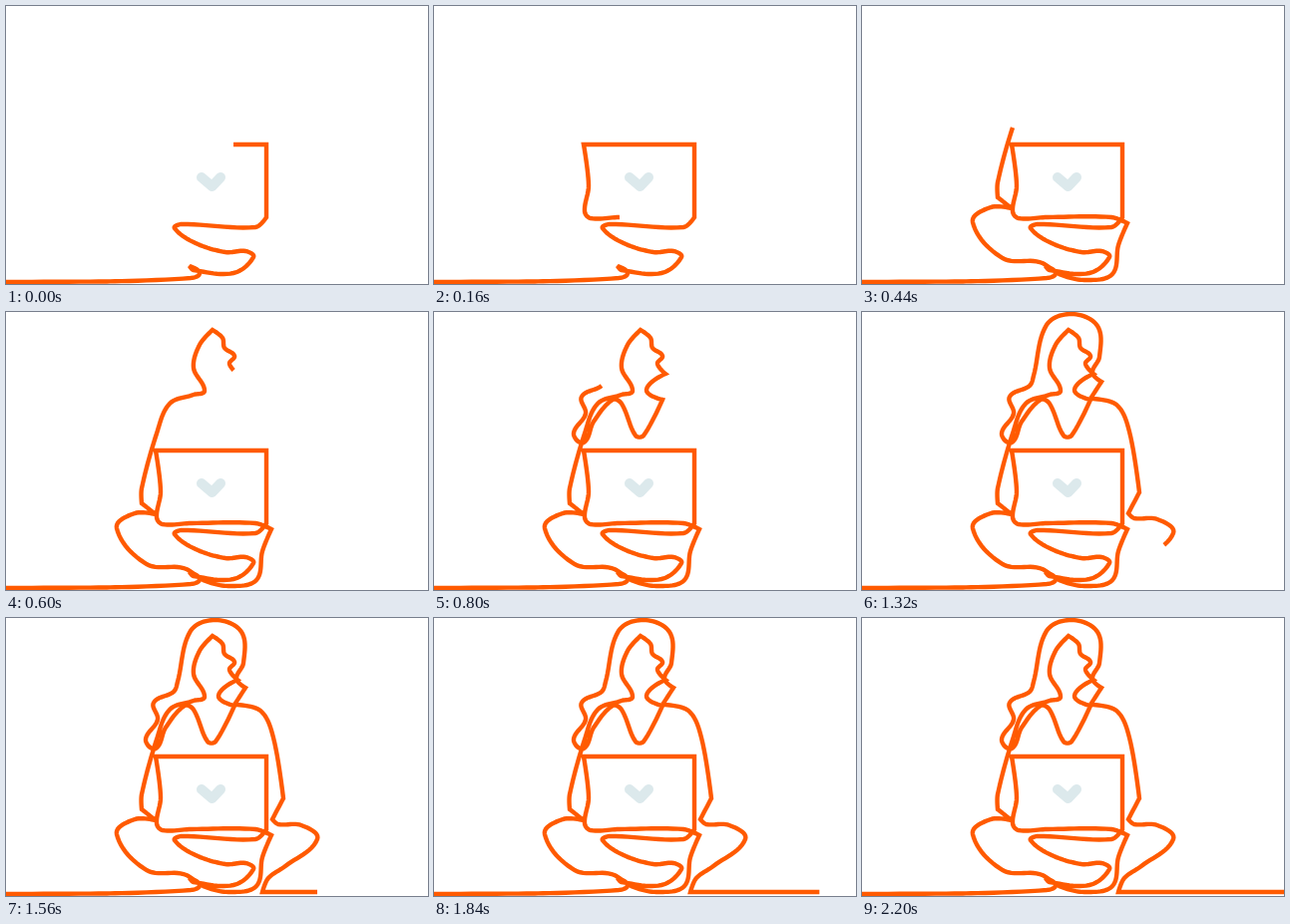
An HTML page with a canvas that plays this animation: 423x279 px, repeating every 3.2 s.

```html
<!DOCTYPE html>
<html lang="en">
<head>
<meta charset="utf-8">
<title>One-line drawing</title>
<style>
html, body { margin: 0; width: 100%; height: 100%; overflow: hidden; background: #fff; }
canvas { display: block; width: 100vw; height: 100vh; }
</style>
</head>
<body>
<canvas id="stage" width="423" height="279"></canvas>
<script>
const LOOP = 3200, STEP = 40, SAMPLES = 12;
const ctx = document.getElementById('stage').getContext('2d');
const knots = [], keys = [];

// Adds key points, "!" for a corner; the pen is at the last one at time t.
function trace(t, text) {
  for (const s of text.split(' ')) {
    const [x, y] = s.split(',').map(parseFloat);
    knots.push({ x, y, corner: s.endsWith('!') });
  }
  const knot = knots[knots.length - 1];
  keys.push({ t, knot });
}

function traceFigure() {
  // ground, shin, laptop side
  trace(0, '0,277! 100,276.5! 185,273 194,268 184,261! 188,265 228,268 248,252 240,246 ' +
    '220,247 190,238 169,223 176,219 250,222 261,212! 261,139! 228,139');
  // laptop
  trace(160, '150,139! 155,180 151,206 157,213 186,212');
  // left leg and arm
  trace(440, '250,212 266,218! 257,240 251,269 225,275 200,270 178,257 141,253 111,217 ' +
    '129,202 150,203! 136,192! 136,177 151,122');
  // shoulder, neck, left of the face
  trace(560, '164,92 188,83 199,79 188,56 194,33 207,18!');
  // right of the face, neckline, lock of hair
  trace(800, '217,26 219,36 229,44 224,52 232,62! 213,78 229,88! 210,124 202,124 188,92 ' +
    '179,88 160,110 150,131 140,122 152,102 148,85 168,74');
  // hair and right shoulder
  trace(1080, '172,64 185,13 210,2 236,14 238,45 231,61 240,70! 229,87! 255,93 268,120');
  // right arm and leg
  trace(1560, '278,181! 267,202! 273,207 296,208 312,222 280,249 263,261 257,275! 312,275');
  // ground
  trace(1680, '352,275');
  trace(2200, '424,275');
}

function tangent(i) {
  const a = knots[i - 1], b = knots[i + 1];
  if (knots[i].corner || !a || !b) return { x: 0, y: 0 };
  const d = Math.hypot(b.x - a.x, b.y - a.y);
  return { x: (b.x - a.x) / d, y: (b.y - a.y) / d };
}

const bezier = (a, b, c, d, u) => {
  const v = 1 - u;
  return a * v * v * v + 3 * b * u * v * v + 3 * c * u * u * v + d * u * u * u;
};

// Samples a smooth curve through the knots, with the length up to each sample.
function measure() {
  const path = [{ x: knots[0].x, y: knots[0].y, len: 0 }];
  for (let i = 1; i < knots.length; i++) {
    const p = knots[i - 1], q = knots[i], a = tangent(i - 1), b = tangent(i);
    const r = Math.hypot(q.x - p.x, q.y - p.y) / 3;
    for (let n = 1; n <= SAMPLES; n++) {
      const at = k => bezier(p[k], p[k] + a[k] * r, q[k] - b[k] * r, q[k], n / SAMPLES);
      const x = at('x'), y = at('y'), last = path[path.length - 1];
      path.push({ x, y, len: last.len + Math.hypot(x - last.x, y - last.y) });
    }
    q.len = path[path.length - 1].len;
  }
  return path;
}

traceFigure();
const path = measure();

// Pen speed at each key: mean of both neighbours, resting at the end.
keys.forEach(k => { k.len = k.knot.len; });
const rate = i => (keys[i + 1].len - keys[i].len) / (keys[i + 1].t - keys[i].t);
keys.forEach((k, i) => {
  k.speed = i === keys.length - 1 ? 0 : (rate(Math.max(i - 1, 0)) + rate(i)) / 2;
});

function drawn(t) {
  const i = keys.findIndex(k => k.t > t);
  if (i < 0) return keys[keys.length - 1].len;
  const a = keys[i - 1], b = keys[i], h = b.t - a.t, u = (t - a.t) / h;
  return bezier(a.len, a.len + a.speed * h / 3, b.len - b.speed * h / 3, b.len, u);
}

function drawHeart() {
  ctx.strokeStyle = '#dce9ec';
  ctx.lineWidth = 10;
  ctx.lineCap = ctx.lineJoin = 'round';
  ctx.beginPath();
  ctx.moveTo(196, 172);
  ctx.lineTo(206.5, 181);
  ctx.lineTo(215, 172);
  ctx.stroke();
}

function drawLine(len) {
  ctx.strokeStyle = '#ff5a00';
  ctx.lineWidth = 4.4;
  ctx.lineCap = 'butt';
  ctx.lineJoin = 'miter';
  ctx.miterLimit = 2;
  ctx.beginPath();
  ctx.moveTo(path[0].x, path[0].y);
  for (let i = 1; i < path.length && path[i - 1].len < len; i++) {
    const p = path[i - 1], q = path[i];
    const u = Math.min(1, (len - p.len) / (q.len - p.len));
    ctx.lineTo(p.x + (q.x - p.x) * u, p.y + (q.y - p.y) * u);
  }
  ctx.stroke();
}

const start = performance.now();
function frame() {
  const t = (performance.now() - start) % LOOP;
  ctx.clearRect(0, 0, 423, 279);
  drawHeart();
  drawLine(drawn(Math.floor(t / STEP) * STEP));
  requestAnimationFrame(frame);
}
frame();
</script>
</body>
</html>
```
